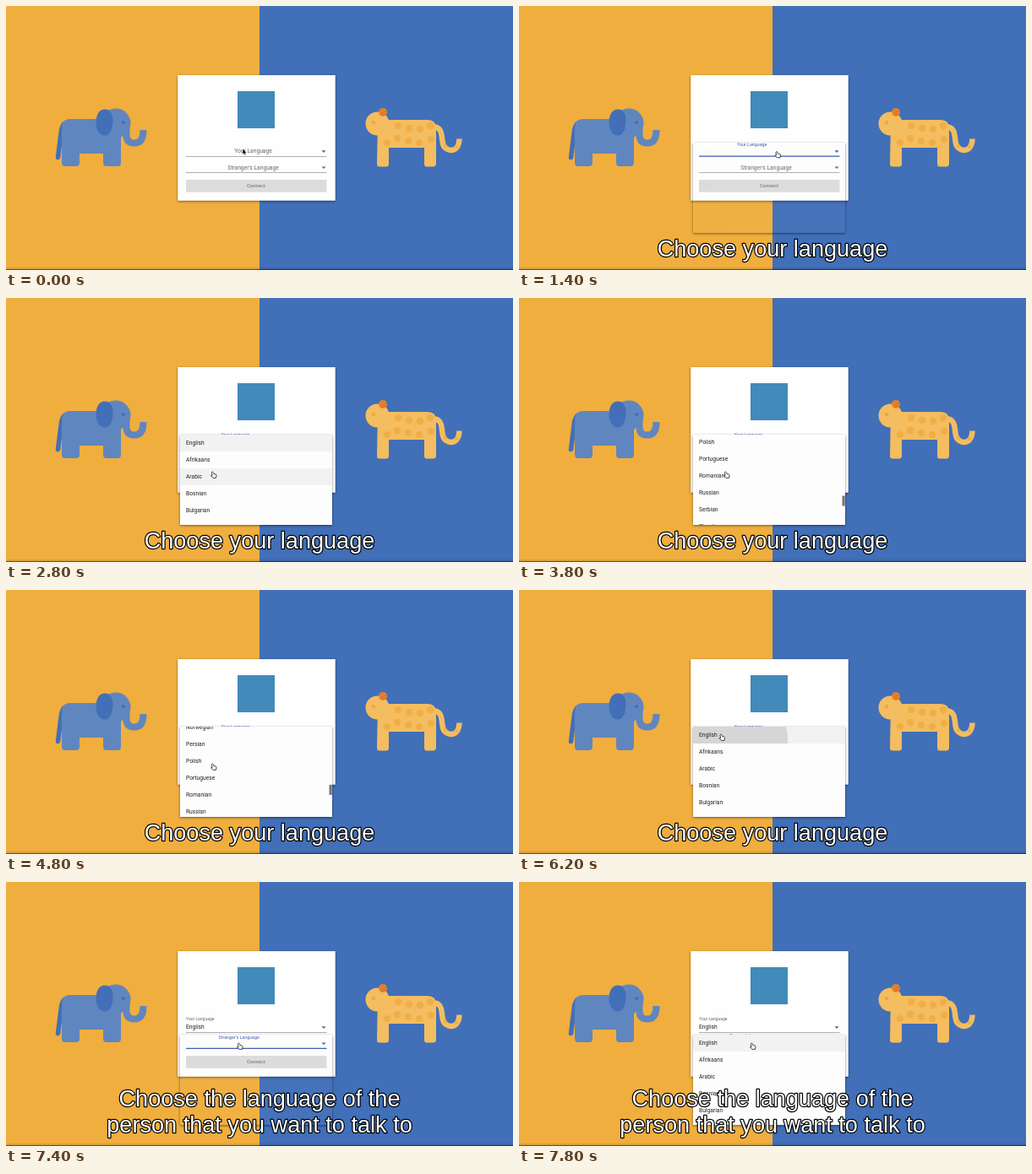
Write an HTML page that moves like this. It is 600x313 px and loops after 8000 ms.

```html
<!DOCTYPE html>
<html lang="en">
<head>
<meta charset="utf-8">
<title>Language picker</title>
<style>
  html, body { margin: 0; width: 100%; height: 100%; overflow: hidden; background: #416fb8; }
  svg { display: block; width: 100vw; height: 100vh; }
  text { font-family: Roboto, sans-serif; font-size: 6.7px; }
  .caption text {
    font: 27.1px "Liberation Sans", Arial, sans-serif; text-anchor: middle;
    fill: #fff; stroke: #000; stroke-width: 2.4px; stroke-linejoin: round; paint-order: stroke;
  }
</style>
</head>
<body>
<svg viewBox="0 0 600 313" preserveAspectRatio="none">
  <defs>
    <filter id="shadow" x="-10%" y="-10%" width="120%" height="125%">
      <feGaussianBlur in="SourceAlpha" stdDeviation="1.4"/>
      <feOffset dy="1"/>
      <feComposite operator="out" in2="SourceAlpha"/>
      <feComponentTransfer><feFuncA type="linear" slope=".5"/></feComponentTransfer>
    </filter>
    <linearGradient id="edge" x2="0" y2="1">
      <stop offset="0" stop-opacity="0"/><stop offset="1" stop-opacity=".18"/>
    </linearGradient>
    <clipPath id="panelClip"><rect x="206" width="180" height="107"/></clipPath>
    <clipPath id="hideClip"><path id="hide"
      d="M440 135H499Q509 135 509 145V187Q509 190.500 505 190.500H498Q495 190.500 495 187V168H453V187Q453 190.500 450 190.500H442Q439 190.500 439 187Z"/></clipPath>
  </defs>

  <rect width="300" height="313" fill="#f0ae3e"/>
  <rect x="300" width="300" height="313" fill="#416fb8"/>
  <rect y="309" width="600" height="4" fill="url(#edge)"/>
  <rect y="312" width="600" height="1" opacity=".45"/>

  <g id="elephant" fill="#6086bf">
    <path d="M71 138.500Q66 140 65 151L61.500 179.500" fill="none" stroke="#426fb8" stroke-width="5.500" stroke-linecap="round"/>
    <path d="M66 143Q67 134 76 134H136V186Q136 190 132 190H119Q115 190 115 186V175H87V186Q87 190 83 190H70Q66 190 66 186Z"/>
    <circle cx="130" cy="139" r="17.500"/>
    <path d="M142.500 140V153Q142.500 162.500 152 162.500Q162.500 162.500 162.500 147" fill="none" stroke="#6086bf" stroke-width="8"/>
    <path d="M117 122.500C123 122.500 126.500 127 126.500 136C126.500 146 123 153.500 117 153.500C110 153.500 106.500 146 106.500 138C106.500 129 110 122.500 117 122.500Z" fill="#426fb8"/>
    <circle cx="139" cy="138" r="2" fill="#426fb8"/>
  </g>

  <g id="leopard" fill="#f3bd60">
    <path d="M504 143C518 143 515 156 517 163C519 173 536 176 536.500 157.500" fill="none" stroke="#f3bd60" stroke-width="6.500"/>
    <use href="#hide"/>
    <g id="spots" clip-path="url(#hideClip)" fill="#f0ae46"></g>
    <circle cx="439.500" cy="139.500" r="14"/>
    <circle cx="446" cy="126" r="5" fill="#e98a2b"/>
    <path d="M442.500 125L447 122M443 128L450 124M445 130L450 127" stroke="#d4572a" stroke-width=".9"/>
    <circle cx="435" cy="138" r="2" fill="#eea437"/>
    <circle cx="520" cy="166" r="2" fill="#f0ae46"/>
    <circle cx="533" cy="167" r="2" fill="#f0ae46"/>
  </g>

  <rect x="203.300" y="82" width="186.400" height="148.700" filter="url(#shadow)"/>
  <rect x="203.300" y="82" width="186.400" height="148.700" fill="#fefefe"/>
  <rect x="274" y="101" width="44" height="44" fill="#418ab9"/>

  <g id="fields"></g>
  <rect x="213" y="206" width="166.500" height="14.800" rx="1" fill="#dcdcdc"/>
  <text x="296" y="215.300" text-anchor="middle" fill="#7c7c7c" style="font-size:5.9px;font-weight:500">Connect</text>

  <g id="panel">
    <rect x="206" width="180" height="107" filter="url(#shadow)"/>
    <g id="sheet" clip-path="url(#panelClip)">
      <rect x="206" width="180" height="107" fill="#fdfdfd"/>
      <g id="list">
        <rect x="206" width="180" height="20" fill="#f2f2f2"/>
        <rect id="hover" x="206" width="180" height="20" fill="#f2f2f2"/>
        <path id="ripple" d="M206 0H316Q318.500 8 318 20H206Z" fill="#d6d6d6"/>
      </g>
      <rect id="thumb" x="382.500" width="3.200" height="12" fill="#757575"/>
    </g>
  </g>

  <g class="caption" id="caption1"><text x="300" y="296.500">Choose your language</text></g>
  <g class="caption" id="caption2">
    <text x="300" y="266">Choose the language of the</text>
    <text x="300" y="296.500">person that you want to talk to</text>
  </g>

  <path id="arrow" d="M0 -1V6L1.600 4.700L2.700 7L3.900 6.500L2.900 4.300H5Z" fill="#000" stroke="#fff" stroke-width=".5"/>
  <path id="hand" d="M-1.700 -3.200Q-.8 -3.900 -.2 -2.800L.5 -.9L2.600 -.6Q3.600 -.2 3.500 1L3.100 3.800H-.7L-2.900 1.300Q-3.100 .3 -1.300 .9L-2.100 -2.200Z"
    fill="#fff" stroke="#222" stroke-width=".85" stroke-linejoin="round"/>
</svg>

<script>
const LOOP = 8000, STEP = 200, ROW = 20, VIEW = 107;
const BLUE = '#3c60b0', GREY = '#666';
const LANGUAGES = ('English Afrikaans Arabic Bosnian Bulgarian Catalan Cantonese Croatian Czech Danish Dutch ' +
  'Estonian Filipino Finnish French German Greek Haitian Hebrew Hindi Hungarian Indonesian Italian Japanese ' +
  'Korean Latvian Lithuanian Malay Maltese Mandarin Norwegian Persian Polish Portuguese Romanian Russian ' +
  'Serbian Slovak Slovenian Spanish Swahili Swedish Tamil Thai Turkish Ukrainian Vietnamese Welsh').split(' ');
const CONTENT = LANGUAGES.length * ROW;

const POINTER = [[400, 280, 170], [1200, 306, 176], [1600, 306, 176], [2400, 245.500, 209.500],
  [5400, 245.500, 209.500], [6000, 240, 174.500], [6600, 240, 174.500], [7200, 276.500, 194.500]];
const SCROLL = [[2800, 0], [4200, 800], [4400, 800], [4800, 609], [5600, 0]];

const $ = id => document.getElementById(id);
const set = (el, attrs) => { for (const k in attrs) el.setAttribute(k, attrs[k]); };
const show = (el, on) => set(el, { visibility: on ? 'visible' : 'hidden' });
function add(parent, tag, attrs, text = '') {
  const el = document.createElementNS('http://www.w3.org/2000/svg', tag);
  set(el, attrs);
  el.textContent = text;
  return parent.appendChild(el);
}

// Eased interpolation through [time, ...values] keys.
function track(keys, t) {
  const next = keys.findIndex(k => k[0] > t);
  if (next === 0) return keys[0].slice(1);
  if (next < 0) return keys[keys.length - 1].slice(1);
  const a = keys[next - 1], b = keys[next];
  const u = (t - a[0]) / (b[0] - a[0]), e = u * u * (3 - 2 * u);
  return a.slice(1).map((v, i) => v + (b[i + 1] - v) * e);
}

for (const [cx, cy] of [[451, 162], [464, 142], [463, 157], [477, 145], [476, 160],
  [490, 146], [489, 162], [502, 142], [503, 158]])
  add($('spots'), 'circle', { cx, cy, r: 4.200 });

LANGUAGES.forEach((name, i) =>
  add($('list'), 'text', { x: 213, y: i * ROW + 12.400, fill: '#222' }, name));

function makeField(name, y) {
  const root = $('fields');
  return {
    y,
    label: add(root, 'text', { 'text-anchor': 'middle' }, name),
    value: add(root, 'text', { x: 213, y: y + 2.400, fill: '#222' }, 'English'),
    line: add(root, 'rect', { x: 213, width: 166.500 }),
    caret: add(root, 'path', { d: `M373.500 ${y - .7}h5l-2.500 2.600z` })
  };
}
const mine = makeField('Your Language', 172);
const theirs = makeField("Stranger's Language", 191.200);

// lift: 0 resting, 1 floating above the line
function drawField(f, lift, focused, chosen) {
  const color = focused ? BLUE : GREY;
  set(f.label, {
    x: chosen ? 229.700 : 292.500 - 21 * lift,
    y: f.y + 2.400 - 10 * lift,
    fill: color,
    style: `font-size:${6.700 - 1.700 * lift}px`
  });
  set(f.line, { y: f.y + (focused ? 5.500 : 6), height: focused ? 1.300 : .7, fill: focused ? BLUE : '#8e8e8e' });
  set(f.caret, { fill: color });
  show(f.value, chosen);
}

function draw(t) {
  const second = t >= 7400, chosen = t >= 6400;
  const open = (t >= 1400 && !chosen) || second;
  const opening = t === 1400 || t === 7400;
  const top = second ? 181 : 162;
  const [px, py] = track(POINTER, t);
  const [scroll] = track(SCROLL, t);
  const scrolling = t > 2800 && t < 5600;

  drawField(mine, t < 1400 ? 0 : t === 1400 ? .8 : 1, t >= 1400 && !second, chosen);
  drawField(theirs, second ? (opening ? .8 : 1) : 0, second, false);

  show($('panel'), open);
  set($('panel'), { transform: `translate(0 ${top})` });
  set($('sheet'), { opacity: opening ? .02 : 1 });
  set($('list'), { transform: `translate(0 ${-scroll})` });
  const row = Math.floor((py - top + scroll) / ROW);
  set($('hover'), { y: row * ROW, opacity: !scrolling && row >= 0 && row < 5 ? 1 : 0 });
  set($('ripple'), { opacity: t === 6200 ? 1 : 0 });
  set($('thumb'), { y: 1 + scroll / CONTENT * VIEW, opacity: scrolling ? 1 : 0 });

  show($('caption1'), t >= 800 && t < 6400);
  show($('caption2'), second);

  const place = { transform: `translate(${px} ${py})` };
  set($('arrow'), place);
  set($('hand'), place);
  show($('arrow'), t < 600);
  show($('hand'), t >= 600);
}

const start = performance.now();
function tick() {
  const t = (performance.now() - start) % LOOP;
  draw(Math.floor(t / STEP) * STEP);
  requestAnimationFrame(tick);
}
tick();
</script>
</body>
</html>
```
